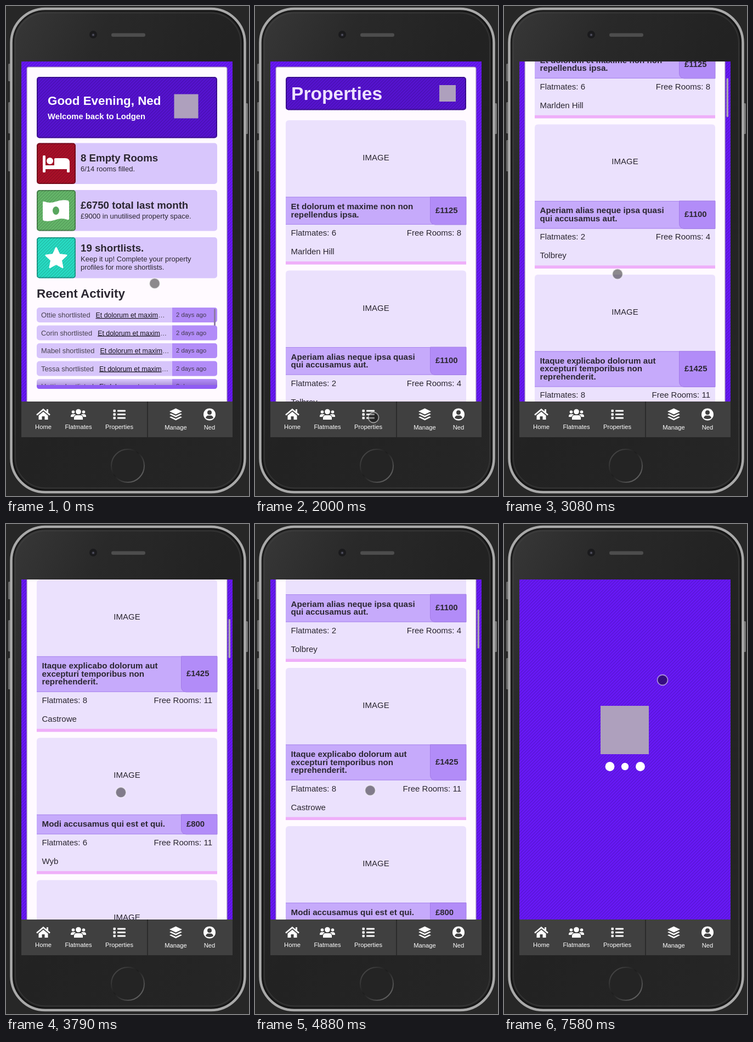
Recreate the animation shown at these times as an HTML page. Size 443 by 892 pixels, loop 8 s.

```html
<!DOCTYPE html>
<html lang="en">
<head>
<meta charset="utf-8">
<title>Flat finder app</title>
<style>
html, body { margin: 0; width: 100%; height: 100%; overflow: hidden; background: #262626; }
svg { display: block; width: 100vw; height: 100vh; font-family: "Liberation Sans", Arial, sans-serif; }
</style>
</head>
<body>
<svg id="stage" viewBox="0 0 443 892" xmlns="http://www.w3.org/2000/svg"></svg>
<script>
const LOOP = 8000;
const INK = '#2a2630', MARK = '#aea0bd';

// Drawing helpers
const rect = (x, y, w, h, fill, r = 0, more = '') =>
  `<rect x="${x}" y="${y}" width="${w}" height="${h}" fill="${fill}" rx="${r}" ${more}/>`;
const dot = (x, y, r, fill, more = '') => `<circle cx="${x}" cy="${y}" r="${r}" fill="${fill}" ${more}/>`;
const path = (d, fill, more = '') => `<path d="${d}" fill="${fill}" ${more}/>`;
const text = (x, y, size, str, more = '', fill = INK) =>
  `<text x="${x}" y="${y}" font-size="${size}" fill="${fill}" ${more}>${str}</text>`;
const BOLD = 'font-weight="700"', MID = 'text-anchor="middle"';

// Striped tile with a darkened rim
const tile = (x, y, w, h, fill) =>
  rect(x, y, w, h, fill, 5) + rect(x, y, w, h, 'url(#hatch)', 5) +
  rect(x + 1, y + 1, w - 2, h - 2, 'none', 4, 'stroke="#000" stroke-opacity=".28" stroke-width="2"');

const logo = (cx, cy, side) => rect(cx - side / 2, cy - side / 2, side, side, MARK);

const frame = h =>
  rect(28, 101, 385, h, '#6919fa') + rect(28, 101, 385, h, 'url(#hatch)') +
  rect(37.5, 110.5, 366, h, '#fffaff', 4, 'stroke="#4b18a8" stroke-opacity=".4" stroke-width="2"') +
  rect(38.5, 111.5, 364, h, 'none', 3, 'stroke="#8a8090" stroke-opacity=".35"');

function home() {
  const bed = rect(67, 272, 5, 31, '#fff', 1.5) + rect(67, 290, 49, 7, '#fff') + rect(111, 289, 5, 14, '#fff', 1.5) +
    dot(80, 282, 6, '#fff') + path('M88 291V279q0-2 2-2H108q8 0 8 8v6z', '#fff');
  const note = path('M67 358q0-3 3-2q10 4 21 0t22-2q2 1 2 4v29q0 3-3 2q-10-4-21 0t-22 2q-2-1-2-4z', '#fff') +
    `<ellipse cx="91" cy="372.5" rx="6" ry="7.5" fill="#58a65e"/>`;
  let pts = '';
  for (let i = 0; i < 10; i++) {
    const r = i % 2 ? 9.4 : 19.5, a = i * Math.PI / 5;
    pts += `${91.5 + r * Math.sin(a)},${460 - r * Math.cos(a)} `;
  }
  const star = `<polygon points="${pts}" fill="#fff" stroke="#fff" stroke-width="3" stroke-linejoin="round"/>`;

  const stat = (y, fill, icon, head, lines) =>
    rect(56, y, 329, 74.5, '#d8c6fc', 5) + tile(56, y, 71, 74.5, fill) + icon +
    lines.map((s, i) => text(136, lines.y + i * 15, 13, s)).join('') +
    text(136, lines.y - 18, 18.7, head, BOLD);
  const at = (y, ...lines) => Object.assign(lines, { y });

  const rows = ['Ottie', 'Corin', 'Mabel', 'Tessa', 'Hattie'].map((name, i) => {
    const y = 549 + i * 32.5;
    return rect(56, y, 329, 27, '#d7c5fb', 5) +
      path(`M303 ${y}h77q5 0 5 5v17q0 5-5 5h-77z`, '#b28cf8') +
      text(64, y + 18, 12.9, `${name} shortlisted<tspan dx="10" font-size="12.4" fill="#17131c" text-decoration="underline">Et dolorum et maxim</tspan><tspan font-size="12.4">…</tspan>`, '', '#48424f') +
      text(310, y + 17, 11.3, '2 days ago', '', '#433a50');
  }).join('');

  return frame(700) + tile(56, 129, 329, 111.5, '#5713d3') +
    text(76, 180, 22.4, 'Good Evening, Ned', BOLD, '#fff') +
    text(76, 206, 14.8, 'Welcome back to Lodgen', BOLD, '#fff') + logo(328.5, 182.5, 44) +
    stat(249.5, '#ab1029', bed, '8 Empty Rooms', at(301, '6/14 rooms filled.')) +
    stat(335, '#66b96b', note, '£6750 total last month', at(387, '£9000 in unutilised property space.')) +
    stat(421, '#28dfc6', star, '19 shortlists.', at(465, 'Keep it up! Complete your property', 'profiles for more shortlists.')) +
    text(56, 531, 22.4, 'Recent Activity', BOLD) +
    `<g clip-path="url(#list)">${rows}${rect(56, 680, 329, 12, 'url(#shade)')}</g>` +
    path('M56 690H385V692q0 5-5 5H61q-5 0-5-5z', '#8f5cf3') +
    rect(379, 551, 3, 31, '#8d7aa8', 1.5);
}

const homes = [
  [['Et dolorum et maxime non non', 'repellendus ipsa.'], 1125, 6, 8, 'Marlden Hill'],
  [['Aperiam alias neque ipsa quasi', 'qui accusamus aut.'], 1100, 2, 4, 'Tolbrey'],
  [['Itaque explicabo dolorum aut', 'excepturi temporibus non', 'reprehenderit.'], 1425, 8, 11, 'Castrowe'],
  [['Modi accusamus qui est et qui.'], 800, 6, 11, 'Wyb'],
  [['Quia nemo sit rerum.'], 950, 3, 5, 'Pellow']
];

function properties() {
  let top = 208;
  const cards = homes.map(([title, price, mates, rooms, place]) => {
    const bar = top + 139.5, h = 21.5 + title.length * 14.5, end = bar + h;
    const card =
      path(`M56 ${end + 72.5}V${top + 6}q0-6 6-6H379q6 0 6 6V${end + 72.5}z`, '#ebe1fd') +
      text(220.5, top + 73, 15, 'IMAGE', MID) +
      rect(56, bar, 329, h, '#c6aafb') +
      path(`M319.5 ${bar}H385V${end}H328q-8.500-1-8.500-10z`, '#b28cf8', 'stroke="#a47be8"') +
      rect(56, bar, 329, 1, '#a985ee') + rect(56, end - 1, 329, 1, '#a985ee') +
      title.map((s, i) => text(65.5, bar + 22.5 + i * 14.5, 15.2, s, BOLD)).join('') +
      text(329, bar + h / 2 + 4, 14.9, '£' + price, BOLD) +
      text(65.5, end + 20, 15, 'Flatmates: ' + mates) +
      text(376, end + 20, 15, 'Free Rooms: ' + rooms, 'text-anchor="end"') +
      text(65.5, end + 54, 15, place) +
      rect(56, end + 67, 329, 5.5, '#efaff9');
    top = end + 83.5;
    return card;
  }).join('');
  return frame(1700) + tile(56, 129, 329, 60.5, '#5713d3') +
    text(66, 171, 33.6, 'Properties', BOLD, '#efe2ff') + logo(351, 159, 30) + cards;
}

const splash = () => rect(28, 101, 385, 619, '#6919fa') + rect(28, 101, 385, 619, 'url(#hatch)') +
  logo(220, 375, 88) + [193, 220.5, 248.5].map(x => dot(x, 441.5, 9, '#fff', 'class="load"')).join('');

function nav() {
  const W = '#fff', BG = '#404040';
  const icons =
    path('M56 744.500 68 734.500 80 744.500', 'none', 'stroke="#fff" stroke-width="2.600"') + rect(74, 734, 3, 6, W) +
    path('M59.500 745.500 68 738.500 76.500 745.500V753H70.500V747H65.500V753H59.500z', W) +
    dot(132, 738.5, 4.8, W) + path('M124 753v-3q0-5 5-5h6q5 0 5 5v3z', W) +
    dot(122.5, 739, 2.8, W) + dot(141.5, 739, 2.8, W) +
    path('M118 748v-1q0-4 4-4h3q1 0 2 1q-3 1-4 4zM146 748v-1q0-4-4-4h-3q-1 0-2 1q3 1 4 4z', W) +
    [737, 743.5, 750].map(y => rect(195.5, y - 2.2, 4.4, 4.4, W, 1) + rect(203, y - 1.5, 15, 3, W, 1)).join('') +
    path('M298 738 309.500 732.500 321 738 309.500 743.500z', W) +
    [743, 748.5].map(y => path(`M298 ${y} 301 ${y - 1.3} 309.500 ${y + 2.7} 318 ${y - 1.3} 321 ${y} 309.500 ${y + 5.8}z`, W)).join('') +
    dot(371, 743.5, 11, W) + dot(371, 740, 4, BG) + path('M364 750q1-4.500 5-4.500h4q4 0 5 4.500q-7 4-14 0z', BG);
  const label = (x, y, s, id = '') => text(x, y, 11.2, s, MID + id, W);
  return rect(28, 720, 385, 65, BG) + rect(257, 720, 2, 65, '#2b2b2b') + icons +
    label(68, 770, 'Home') + label(132, 770, 'Flatmates') + label(206.5, 770, 'Properties', ' id="tab"') +
    label(309.5, 771, 'Manage') + label(371, 771, 'Ned');
}

const phone = () =>
  rect(0, 0, 443, 892, '#272727') +
  [[105, 32], [175, 57], [244, 57]].map(([y, h]) => rect(4, y, 5, h, '#6a6a6a', 1.5)).join('') +
  rect(436, 177, 5, 56, '#777', 1.5) +
  rect(9.5, 5, 426, 880, 'url(#body)', 62, 'stroke="#a9a9a9" stroke-width="4.500"') +
  rect(13.5, 9, 418, 872, 'none', 58, 'stroke="#111" stroke-width="2.500" stroke-opacity=".7"') +
  rect(17, 12.5, 411, 865, 'none', 55, 'stroke="#444" stroke-width="2" stroke-opacity=".5"') +
  dot(159, 52, 7, '#1a1a1c') + dot(159, 52.5, 2.6, '#34343f') + dot(159, 52.5, 1, '#70707c') +
  rect(192, 49.5, 62, 6.5, '#4d4d4d', 3.2) +
  dot(222, 837, 30, '#242424', 'stroke="url(#ring)" stroke-width="2"');

const grad = (id, stops, dir = 'x1="0" y1="0" x2="1" y2="1"') =>
  `<linearGradient id="${id}" ${dir}>${stops.map(([o, c, a = 1]) =>
    `<stop offset="${o}" stop-color="${c}" stop-opacity="${a}"/>`).join('')}</linearGradient>`;

const stage = document.getElementById('stage');
stage.innerHTML = `<defs>
  <pattern id="hatch" width="4" height="4" patternUnits="userSpaceOnUse" patternTransform="rotate(45)">
    <rect width="1.500" height="4" fill="#000" fill-opacity=".16"/></pattern>
  <clipPath id="screen"><rect x="28" y="101" width="385" height="619"/></clipPath>
  <clipPath id="list"><rect x="56" y="549" width="329" height="142"/></clipPath>
  ${grad('body', [[0, '#383838'], [.22, '#292929'], [.5, '#222'], [1, '#262626']])}
  ${grad('ring', [[0, '#555'], [.45, '#1d1d1d'], [1, '#777']])}
  ${grad('shade', [[0, '#50308a', 0], [1, '#50308a', .35]], 'x1="0" y1="0" x2="0" y2="1"')}
  </defs>${phone()}
  <g clip-path="url(#screen)">
    <g id="home">${home()}</g>
    <g id="props"><g id="scroll">${properties()}</g>${rect(405.5, 0, 3.5, 71, '#a9a3b4', 1.7, 'id="thumb"')}</g>
    <g id="splash">${splash()}</g>
  </g>${nav()}
  ${dot(0, 0, 9.5, '#000', 'id="cursor" fill-opacity=".45" stroke="#fff" stroke-opacity=".5" stroke-width="1.800"')}`;

const $ = id => document.getElementById(id);
const [homeEl, props, scroll, thumb, splashEl, tab, cursor] =
  ['home', 'props', 'scroll', 'thumb', 'splash', 'tab', 'cursor'].map($);
const dots = [...document.querySelectorAll('.load')];

// Keys are [time, ...values]; each span is eased
const smooth = k => k * k * (3 - 2 * k);
const out = k => 1 - (1 - k) * (1 - k);
function track(keys, t, ease) {
  const i = keys.findIndex(k => k[0] > t);
  if (i < 0) return keys[keys.length - 1].slice(1);
  if (i === 0) return keys[0].slice(1);
  const a = keys[i - 1], b = keys[i], k = ease((t - a[0]) / (b[0] - a[0]));
  return a.slice(1).map((v, j) => v + (b[j + 1] - v) * k);
}

const cursorKeys = [[470, 271, 505], [1000, 212.5, 717.5], [1669, 212.5, 717.5], [1670, 216, 749],
  [2110, 216, 749], [2830, 207, 488], [3460, 207, 488], [4040, 211, 489], [4250, 211, 489],
  [4880, 210, 485], [5060, 270, 336], [5500, 289, 284]];
const scrollKeys = [[3000, 0], [3080, 265], [3250, 360], [3460, 360], [4040, 720], [4210, 720],
  [4250, 690], [4880, 493]];
const thumbKeys = [[3000, 0], [3060, 1], [5300, 1], [5500, 0]];

function draw(t) {
  const [x, y] = track(cursorKeys, t, smooth);
  cursor.setAttribute('cx', x);
  cursor.setAttribute('cy', y);

  const fade = Math.min(1, Math.max(0, (t - 1800) / 200));
  const loading = t >= 5710;
  homeEl.style.display = fade < 1 ? '' : 'none';
  props.style.display = fade > 0 && !loading ? '' : 'none';
  props.setAttribute('opacity', fade);
  splashEl.style.display = loading ? '' : 'none';
  tab.setAttribute('opacity', t >= 1670 && t < 1830 ? .8 : 1);

  const [s] = track(scrollKeys, t, out);
  scroll.setAttribute('transform', `translate(0 ${-s})`);
  thumb.setAttribute('y', 102.5 + s * .108);
  thumb.setAttribute('opacity', track(thumbKeys, t, smooth)[0]);

  // The loader rests briefly, then holds at the end
  const lt = t > 7170 && t < 7330 ? 7170 : Math.min(t, 7580);
  const p = ((lt - 6084) / 800 % 1 + 1) % 1;
  const tri = 1 - Math.abs(1 - 2 * p);
  dots.forEach((d, i) => d.setAttribute('r', 5.7 + 3.7 * (i === 1 ? tri : 1 - tri)));
}

const start = performance.now();
function tick() {
  draw((performance.now() - start) % LOOP);
  requestAnimationFrame(tick);
}
tick();
</script>
</body>
</html>
```
